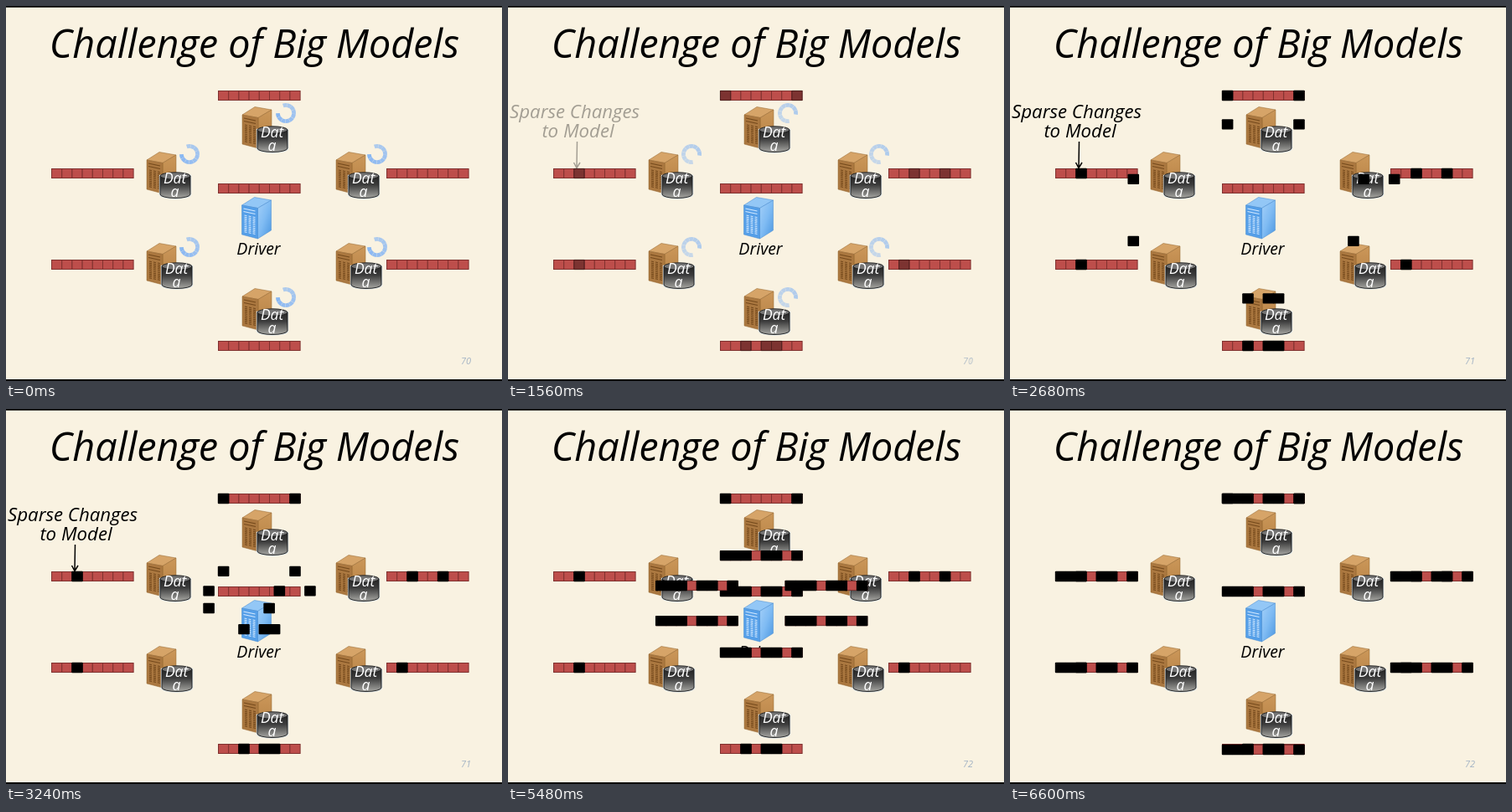
Write an HTML page that moves like this. It is 592 by 448 pixels and loops after 6640 ms.

```html
<!DOCTYPE html>
<html lang="en">
<head>
<meta charset="utf-8">
<title>Challenge of Big Models</title>
<style>
html, body { margin: 0; width: 100%; height: 100%; overflow: hidden; background: #f9f2e1; }
svg { display: block; width: 592px; height: 448px; }
text { font-family: "Open Sans", "Noto Sans", sans-serif; font-style: italic; text-anchor: middle; }
</style>
</head>
<body>
<svg id="stage" viewBox="0 0 592 448" xmlns="http://www.w3.org/2000/svg">
  <defs>
    <linearGradient id="drum" x2="0" y2="1">
      <stop offset="0" stop-color="#262626"/>
      <stop offset=".4" stop-color="#3c3c3c"/>
      <stop offset="1" stop-color="#a6a6a2"/>
    </linearGradient>
    <linearGradient id="tan" x2="0" y2="1">
      <stop offset="0" stop-color="#cb9759"/>
      <stop offset="1" stop-color="#b37e42"/>
    </linearGradient>
    <linearGradient id="blue" x2="1" y2="1">
      <stop offset="0" stop-color="#a4d0f8"/>
      <stop offset=".5" stop-color="#7fbbf3"/>
      <stop offset="1" stop-color="#4a96e0"/>
    </linearGradient>
  </defs>
</svg>
<script>
const LOOP = 6640;
const CELL = 12.2, BAR_H = 11;
const svg = document.getElementById('stage');

function add(parent, tag, attrs, text) {
  const el = document.createElementNS(svg.namespaceURI, tag);
  for (const key in attrs) el.setAttribute(key, attrs[key]);
  if (text) el.textContent = text;
  parent.appendChild(el);
  return el;
}
const group = (parent, x = 0, y = 0) => add(parent, 'g', { transform: `translate(${x} ${y})` });
const label = (parent, x, y, size, text, fill = '#000') =>
  add(parent, 'text', { x, y, 'font-size': size, fill }, text);
const show = (el, opacity) => el.setAttribute('opacity', opacity);
const move = (el, x, y) => el.setAttribute('transform', `translate(${x} ${y})`);
const clamp = v => Math.max(0, Math.min(1, v));
const ramp = (t, start, length) => clamp((t - start) / length);
const mix = (a, b, p) => a + (b - a) * p;
const smooth = p => p < .5 ? 2 * p * p : 1 - 2 * (1 - p) ** 2;

// Workers: server corner, drum offset, spinner centre, bar corner, changed cells,
// and how far the gathered cells (path) and spread bar (end) miss their slot
const workers = [
  { at: [281, 120], drum: [19, 24], spin: [334, 128], bar: [253.5, 101.5], cells: [0, 7], path: -1, end: 0 },
  { at: [167, 174], drum: [17, 25], spin: [219, 177], bar: [54.5, 194.5], cells: [2], path: 4, end: 0 },
  { at: [393, 174], drum: [16, 25], spin: [443, 177], bar: [454.5, 194.5], cells: [2, 5], path: 4, end: 0 },
  { at: [167, 283], drum: [19, 24], spin: [219, 288], bar: [54.5, 303.5], cells: [2], path: 1, end: 0 },
  { at: [393, 283], drum: [19, 24], spin: [443, 288], bar: [454.5, 303.5], cells: [1], path: 1, end: 0 },
  { at: [281, 337], drum: [19, 25], spin: [334, 348], bar: [253.5, 400.5], cells: [2, 4, 5], path: 7, end: 1 }
];
const hub = [253.5, 212.5];
const merged = [...new Set(workers.flatMap(w => w.cells))];

const tan = { top: '#d6a468', front: '#ab7840', side: 'url(#tan)', edge: '#93652f', slot: '#74491c' };
const blue = { top: '#93c7f6', front: '#559fe8', side: 'url(#blue)', edge: '#4388d0', slot: '#d3e9ff' };

function drawServer(x, y, c) {
  const g = group(svg, x, y);
  const face = (points, fill) =>
    add(g, 'polygon', { points, fill, stroke: c.edge, 'stroke-width': .5, 'stroke-linejoin': 'round' });
  face('1,10 16,.5 36,4 20,13.5', c.top);
  face('20,13.5 36,4 36,40 20,50', c.side);
  face('1,10 20,13.5 20,50 1,45', c.front);
  let d = 'M3 14l14 3M3 17.5l14 3';
  for (let row = 0; row < 10; row++)
    for (let col = 0; col < 3; col++) d += `M${4 + col * 5} ${22 + row * 2.2 + col}l3 .7`;
  add(g, 'path', { d, stroke: c.slot, 'stroke-width': 1.1, fill: 'none' });
}

function drawDrum(x, y) {
  const g = group(svg, x, y);
  const body = 'M0 4V26A18 4.5 0 0 0 36 26V4Z';
  add(g, 'path', { d: body, fill: 'none', stroke: '#dce6ea', 'stroke-width': 2.4 });
  add(g, 'path', { d: body, fill: 'url(#drum)', stroke: '#1a1a1a', 'stroke-width': .9 });
  add(g, 'ellipse', { cx: 18, cy: 4, rx: 18, ry: 4.2, fill: '#747474', stroke: '#1a1a1a', 'stroke-width': .9 });
  label(g, 17.5, 13, 17.5, 'Dat', '#fff');
  label(g, 17.5, 28.5, 17.5, 'a', '#fff');
}

function drawBar([x, y]) {
  const g = group(svg, x, y);
  for (let i = 0; i < 8; i++)
    add(g, 'rect', { x: i * CELL, y: 0, width: CELL, height: BAR_H, fill: '#bd4e4b', stroke: '#7f312f' });
  return g;
}

function drawMarks(parent, cells) {
  const g = group(parent);
  for (const i of cells)
    add(g, 'rect', { x: i * CELL - .7, y: -.7, width: CELL + 1.4, height: BAR_H + 1.4, rx: 1, fill: '#000' });
  return g;
}

function drawSpinner([x, y]) {
  const g = group(svg, x, y), ring = add(g, 'g', {});
  const point = deg => {
    const a = deg * Math.PI / 180;
    return `${(9.6 * Math.cos(a)).toFixed(2)} ${(9.6 * Math.sin(a)).toFixed(2)}`;
  };
  for (let i = 0; i < 10; i++) {
    const a = 35 + i * 29;
    add(ring, 'path', {
      d: `M${point(a)}A9.6 9.6 0 0 1 ${point(a + 28)}`,
      fill: 'none', stroke: '#85b5f3', 'stroke-width': 4.8, opacity: .65 + i * .035
    });
  }
  return { g, ring };
}

add(svg, 'rect', { width: 592, height: 448, fill: '#f9f2e1' });
add(svg, 'rect', { width: 592, height: 1.7, fill: '#000' });
add(svg, 'rect', { y: 446, width: 592, height: 2, fill: '#000' });
label(svg, 296.5, 61.5, 46.8, 'Challenge of Big Models');

const pages = [70, 71, 72].map(n => label(svg, 549, 428, 11, String(n), '#a3b3c4'));

const note = group(svg);
label(note, 79.5, 133.5, 22.3, 'Sparse Changes');
label(note, 83.5, 156.5, 22.3, 'to Model');
add(note, 'path', { d: 'M82.5 162L82 193M78.5 187L82 193.5L86 187', fill: 'none', stroke: '#000', 'stroke-width': 1.5 });

const hubMarks = drawMarks(drawBar(hub), merged);
for (const w of workers) {
  w.marks = drawMarks(drawBar(w.bar), w.cells);
  drawServer(...w.at, tan);
  drawDrum(w.at[0] + w.drum[0], w.at[1] + w.drum[1]);
  w.spinner = drawSpinner(w.spin);
}
drawServer(280.5, 228, blue);
label(svg, 301.5, 296.5, 19.6, 'Driver');

for (const w of workers) w.sent = drawMarks(svg, w.cells);
for (const w of workers) {
  w.copy = drawBar(hub);
  drawMarks(w.copy, merged);
}

function render(t) {
  const enter = ramp(t, 1390, 500);
  const leave = ramp(t, 4090, 160);
  const gather = smooth(ramp(t, 1890, 2000));
  const spread = smooth(ramp(t, 4602, 2000));
  const angle = mix(215, 405, ramp(t, 0, 840));

  show(note, enter * (1 - leave));
  show(pages[0], 1 - enter);
  show(pages[1], enter * (1 - leave));
  show(pages[2], leave);
  show(hubMarks, t >= 4090 ? 1 : 0);

  for (const w of workers) {
    const [x, y] = w.bar;
    show(w.marks, enter);
    show(w.spinner.g, 1 - enter);
    w.spinner.ring.setAttribute('transform', `rotate(${angle})`);
    show(w.sent, t >= 1890 && t < 4090 ? 1 : 0);
    move(w.sent, mix(x, hub[0], gather), mix(y, hub[1] + w.path, gather));
    show(w.copy, t >= 4602 ? 1 : 0);
    move(w.copy, mix(hub[0], x, spread), mix(hub[1], y + w.end, spread));
  }
}

const begin = performance.now();
function tick() {
  render((performance.now() - begin) % LOOP);
  requestAnimationFrame(tick);
}
render(0);
requestAnimationFrame(tick);
</script>
</body>
</html>
```
